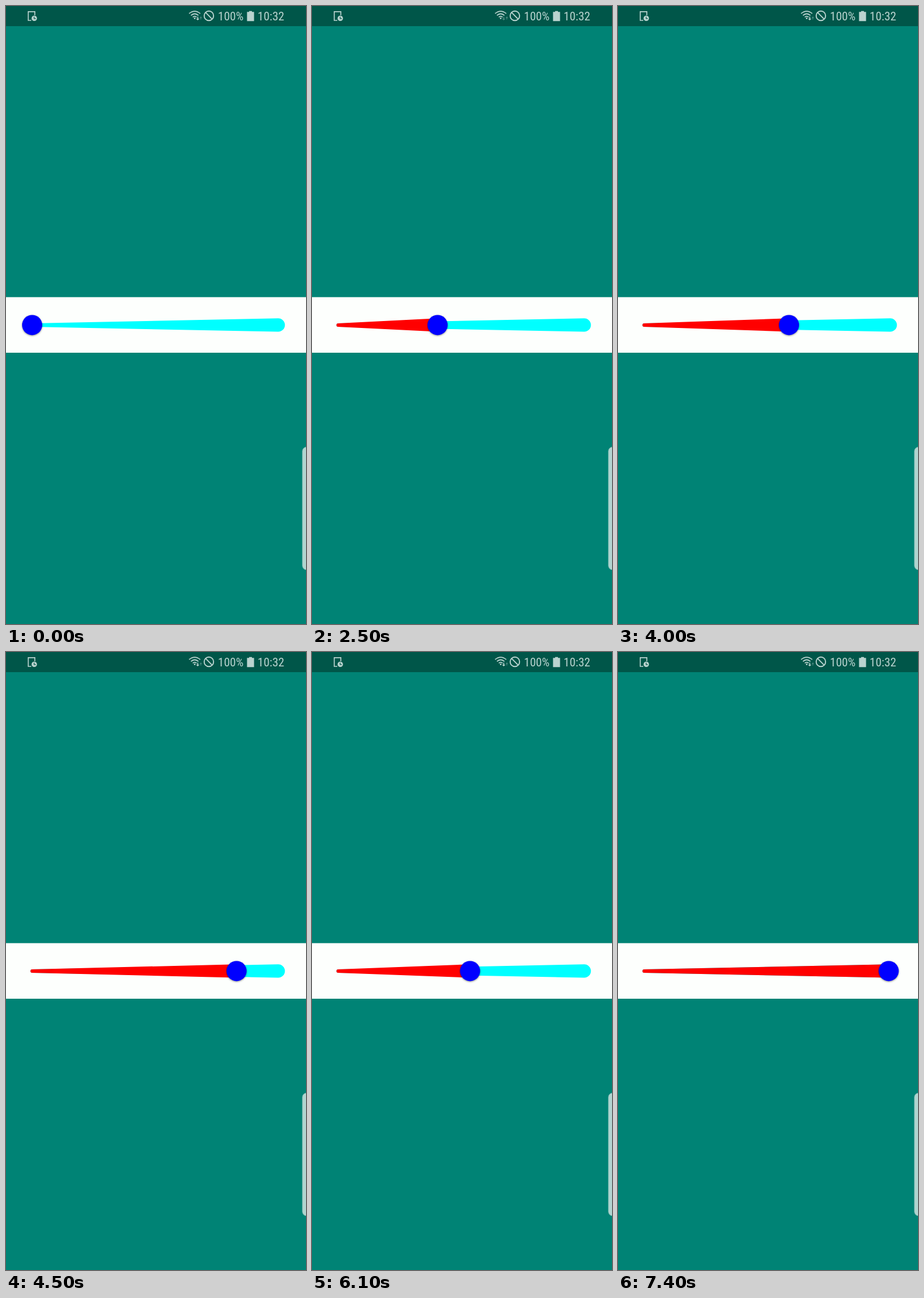
Recreate the animation shown at these times as an HTML page. Size 522 by 1073 pixels, loop 7.7 s.

```html
<!DOCTYPE html>
<html lang="en">
<head>
<meta charset="utf-8">
<title>Wedge slider</title>
<style>
  html, body { margin: 0; height: 100%; overflow: hidden; background: #008375; }
  svg { display: block; width: 100%; height: 100%; }
  text { font: 21px "Roboto Condensed", Roboto, sans-serif; font-stretch: 75%; text-anchor: middle; }
  #thumb { filter: drop-shadow(0 1.5px 1.8px rgba(0, 0, 0, .45)); }
</style>
</head>
<body>
<svg viewBox="0 0 522 1073">
  <rect width="522" height="1073" fill="#008375"/>
  <rect width="522" height="35" fill="#005649"/>

  <!-- status bar -->
  <g fill="#bad3cf">
    <path d="M44 25H38.7V9.9H50.2V16" fill="none" stroke="#bad3cf" stroke-width="1.7"/>
    <circle cx="49.2" cy="21.4" r="4.7"/>
    <path d="M49 18.5V21.8H51.8" fill="none" stroke="#005649" stroke-width="1.2"/>
    <g fill="none" stroke="#bad3cf" stroke-width="1.7">
      <path d="M318.6 13.2Q328.3 5.2 338 13.2M321.8 16.4Q328.3 10.6 334.8 16.4M325 19.3Q328.3 16.4 331.6 19.3"/>
      <circle cx="353" cy="17" r="8.2" stroke-width="1.9"/>
      <path d="M347.2 11.2L358.8 22.8" stroke-width="1.9"/>
    </g>
    <circle cx="328.3" cy="21.4" r="1.4"/>
    <path id="down" d="M332.8 18.5H334.4V22H336.4L333.6 25L330.8 22H332.8Z"/>
    <path d="M338.4 23.5V20.7H336.8L339 18L341.2 20.7H339.6V23.5Z" opacity=".4"/>
    <text x="391" y="25.4">100%</text>
    <path d="M423 8.7H428V10.3H431.6V26.2H419.4V10.3H423Z"/>
    <text x="461" y="25.4">10:32</text>
  </g>

  <!-- slider -->
  <rect y="505.5" width="522" height="96.5" fill="#fdfffd"/>
  <path id="track" fill="#00ffff"/>
  <path id="fill" fill="#ff0000"/>
  <circle id="thumb" cy="553.9" r="17.5" fill="#0000ff"/>

  <rect x="515.8" y="765.8" width="20" height="213" rx="7" fill="#b1d5d0" stroke="#7db9b1"/>
</svg>
<script>
const LOOP = 7700, STEP = 100, MIN = 45.5, MAX = 471;
const el = id => document.getElementById(id);

// Thumb position: [ms, x]
const keys = [
  [0, MIN], [2000, MIN], [2500, 218.5], [3000, 401], [3400, MAX],
  [3600, MAX], [4000, 297.5], [4100, 257], [4400, 422], [5100, MIN],
  [5400, MIN], [6100, 275], [6200, 310], [6900, MAX], [LOOP, MAX]
];

// Speed at a key, zero where the thumb rests or turns
function slope(i) {
  const a = keys[i - 1], b = keys[i], c = keys[i + 1];
  if (!a || !c || (b[1] - a[1]) * (c[1] - b[1]) <= 0) return 0;
  return (c[1] - a[1]) / (c[0] - a[0]);
}

function thumbX(t) {
  const i = keys.findIndex(k => k[0] > t) - 1;
  const [t0, x0] = keys[i], [t1, x1] = keys[i + 1];
  const d = t1 - t0, u = (t - t0) / d, v = 1 - u;
  return x0 * v * v * (1 + 2 * u) + x1 * u * u * (3 - 2 * u)
    + d * u * v * (slope(i) * v - slope(i + 1) * u);
}

const wedge = x =>
  `M${MIN} 551L${x} 542.3A11.6 11.6 0 0 1 ${x} 565.5L${MIN} 557A3 3 0 0 1 ${MIN} 551Z`;

const between = (t, a, b) => t >= a && t < b;

function draw(now) {
  const t = Math.floor(now % LOOP / STEP) * STEP;
  const x = thumbX(t);
  el("fill").setAttribute("d", wedge(x));
  el("thumb").setAttribute("cx", x);
  const idle = between(t, 1400, 3200) || between(t, 6600, 7400);
  el("down").setAttribute("opacity", idle ? .4 : 1);
}

el("track").setAttribute("d", wedge(473.7));
const start = performance.now();
function tick() {
  draw(performance.now() - start);
  requestAnimationFrame(tick);
}
tick();
</script>
</body>
</html>
```
